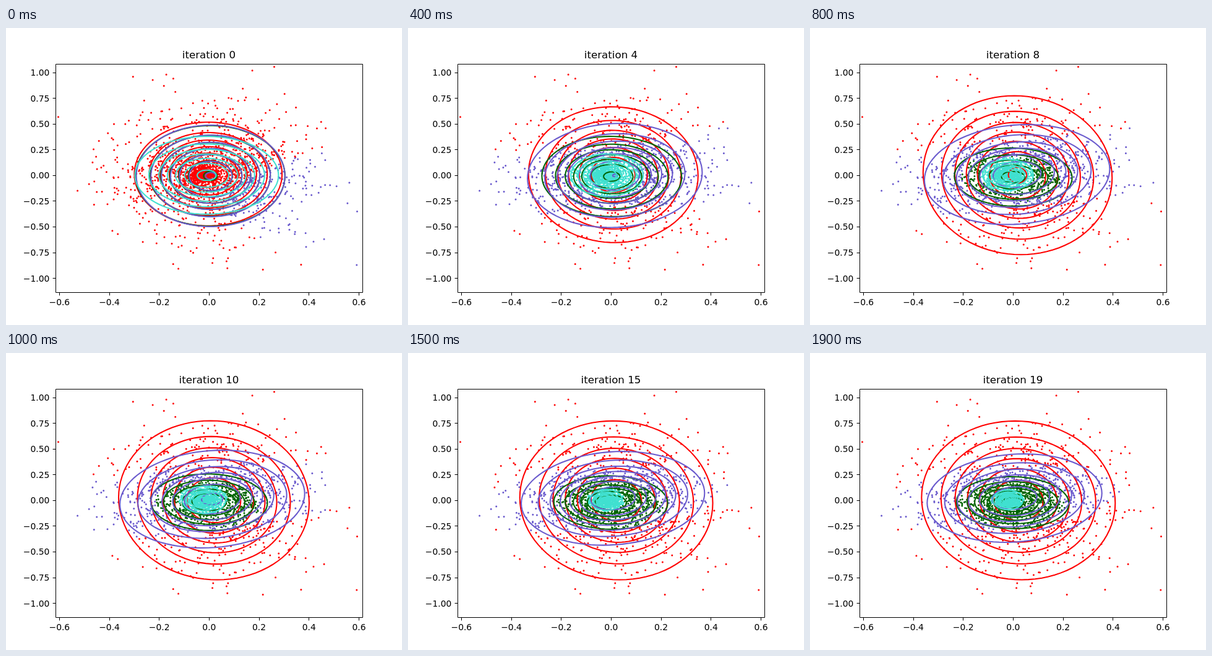
Animation of 640x480 px, one loop 2000 ms. Source, as an HTML page:

```html
<!DOCTYPE html>
<html lang="en">
<head>
<meta charset="utf-8">
<title>Gaussian mixture fit</title>
<style>
  html, body { margin: 0; width: 100%; height: 100%; overflow: hidden; background: #fff; }
  svg { display: block; width: 100vw; height: 100vh; }
  text { font: 13.89px "DejaVu Sans", sans-serif; fill: #000; }
  #title { font-size: 16.67px; text-anchor: middle; }
  .xl { text-anchor: middle; }
  .yl { text-anchor: end; }
  .dots { fill: none; stroke-width: 3; stroke-linecap: round; }
  .rings { fill: none; stroke-width: 2.08; }
  .axis { fill: none; stroke: #000; stroke-width: 1; }
</style>
</head>
<body>
<svg viewBox="0 0 640 480">
  <clipPath id="area"><rect x="80" y="57.6" width="496" height="369.6"/></clipPath>
  <g id="plot" clip-path="url(#area)"></g>
  <g id="axes"></g>
  <text id="title" x="328" y="49"></text>
</svg>
<script>
const NS = 'http://www.w3.org/2000/svg';
const STEP_MS = 100, STEPS = 20;
const X0 = 328.4, Y0 = 238.35, XS = 403.4, YS = 166.25;
const px = x => X0 + x * XS;
const py = y => Y0 - y * YS;

function add(parent, tag, attrs, text = '') {
  const el = document.createElementNS(NS, tag);
  for (const k in attrs) el.setAttribute(k, attrs[k]);
  el.textContent = text;
  return parent.appendChild(el);
}

// Saturating growth from 0 to 1
const settle = (t, tau, power) => 1 - Math.exp(-((t / tau) ** power));
const early = t => settle(t, 4.15, 2.3);

// A start value plus an early and a late change
const drift = (from, first, then, tau) => t =>
  from.map((v, i) => v + first[i] * early(t) + then[i] * settle(t, tau, 2));

// Vectors hold mean x, mean y, sigma x, sigma y, weight
const parts = [
  { color: '#ff0000', tilt: -.035, count: 640,
    at: drift([-.004, .014, .151, .2573, .305], [.019, -.01, .034, .131, -.055], [.006, -.003, .0135, .006, 0], 10) },
  { color: '#006400', tilt: -.03, count: 490,
    at: drift([.0045, -.004, .151, .247, .21], [-.003, -.008, -.0115, -.0755, -.03], [-.004, -.01, -.03, -.05, .08], 12) },
  { color: '#6a5acd', tilt: .11, count: 470,
    at: drift([.0057, -.004, .1506, .2494, .275], [.02, 0, .05, .026, .02], [-.021, .028, -.0225, -.0575, -.06], 10) },
  { color: '#40e0d0', tilt: 0, count: 490,
    at: t => {
      const e = early(t), q = 1 + t / 3;
      return [-.01 - .011 * e, .002 + .004 * e, .1445 * q ** -.79, .19 * q ** -.7, .2 + .05 * e];
    } }];

function gaussian(part, it) {
  const [mx, my, sx, sy, w] = part.at(it);
  const rho = part.tilt * Math.min(1, it / 8), k = Math.sqrt(1 - rho * rho);
  return { mx, my, sx, sy, w, rho, k, peak: 1 / (2 * Math.PI * sx * sy * k) };
}

// Point at polar position (r, a) in units of sigma
function place(g, r, a) {
  const c = r * Math.cos(a), s = r * Math.sin(a);
  return [g.mx + g.sx * c, g.my + g.sy * (g.rho * c + g.k * s)];
}

function score(g, [x, y]) {
  const a = (x - g.mx) / g.sx, b = (y - g.my) / g.sy;
  return Math.log(g.w * g.peak) - (a * a + b * b - 2 * g.rho * a * b) / (2 * g.k * g.k);
}

// Round contour spacing, at most eight intervals below the peak
function spacing(peak) {
  const raw = peak / 8, mag = 10 ** Math.floor(Math.log10(raw));
  return mag * [1, 1.5, 2, 2.5, 3, 4, 5, 6, 8, 10].find(s => s * mag >= raw);
}

function rings(g) {
  const step = spacing(g.peak);
  let d = '';
  for (let level = step; level < g.peak; level += step) {
    const r = Math.sqrt(2 * Math.log(g.peak / level));
    for (let i = 0; i < 90; i++) {
      const [x, y] = place(g, r, i * Math.PI / 45);
      d += (i ? 'L' : 'M') + px(x).toFixed(2) + ' ' + py(y).toFixed(2);
    }
    d += 'Z';
  }
  return d;
}

let seed = 20;
function rand() {
  seed = (seed + 0x6D2B79F5) | 0;
  let t = Math.imul(seed ^ seed >>> 15, seed | 1);
  t ^= t + Math.imul(t ^ t >>> 7, t | 61);
  return ((t ^ t >>> 14) >>> 0) / 4294967296;
}

// The data are drawn from the mixture at the last iteration
const points = parts.flatMap(part => {
  const g = gaussian(part, STEPS - 1);
  return Array.from({ length: part.count }, () =>
    place(g, Math.sqrt(-2 * Math.log(1 - rand())), rand() * 2 * Math.PI));
});
const marks = points.map(([x, y]) => `M${px(x).toFixed(1)} ${py(y).toFixed(1)}h0`);

const plot = document.getElementById('plot');
const axes = document.getElementById('axes');
const title = document.getElementById('title');
for (const p of parts) p.dots = add(plot, 'path', { class: 'dots', stroke: p.color });
for (const p of parts) p.rings = add(plot, 'path', { class: 'rings', stroke: p.color });

const label = (v, digits) => v.toFixed(digits).replace('-', '\u2212');
const snap = v => Math.round(v - .5) + .5;
let ticks = 'M80.5 58.5H576.5V427.5H80.5Z';
for (let i = -3; i <= 3; i++) {
  const x = px(i * .2);
  ticks += `M${snap(x)} 427.5v4.9`;
  add(axes, 'text', { class: 'xl', x, y: 448 }, label(i * .2, 1));
}
for (let i = -4; i <= 4; i++) {
  const y = py(i * .25);
  ticks += `M80.5 ${snap(y)}h-4.9`;
  add(axes, 'text', { class: 'yl', x: 70.3, y: Math.round(y + 5) }, label(i * .25, 2));
}
add(axes, 'path', { class: 'axis', d: ticks });

function draw(it) {
  const gs = parts.map(p => gaussian(p, it));
  const paths = parts.map(() => '');
  points.forEach((pt, i) => {
    const scores = gs.map(g => score(g, pt));
    paths[scores.indexOf(Math.max(...scores))] += marks[i];
  });
  parts.forEach((p, i) => {
    p.dots.setAttribute('d', paths[i]);
    p.rings.setAttribute('d', rings(gs[i]));
  });
  title.textContent = 'iteration ' + it;
}

let shown = -1;
const start = performance.now();
function tick(now) {
  const it = Math.floor(Math.max(0, now - start) / STEP_MS) % STEPS;
  if (it !== shown) draw(shown = it);
  requestAnimationFrame(tick);
}
tick(start);
</script>
</body>
</html>
```
